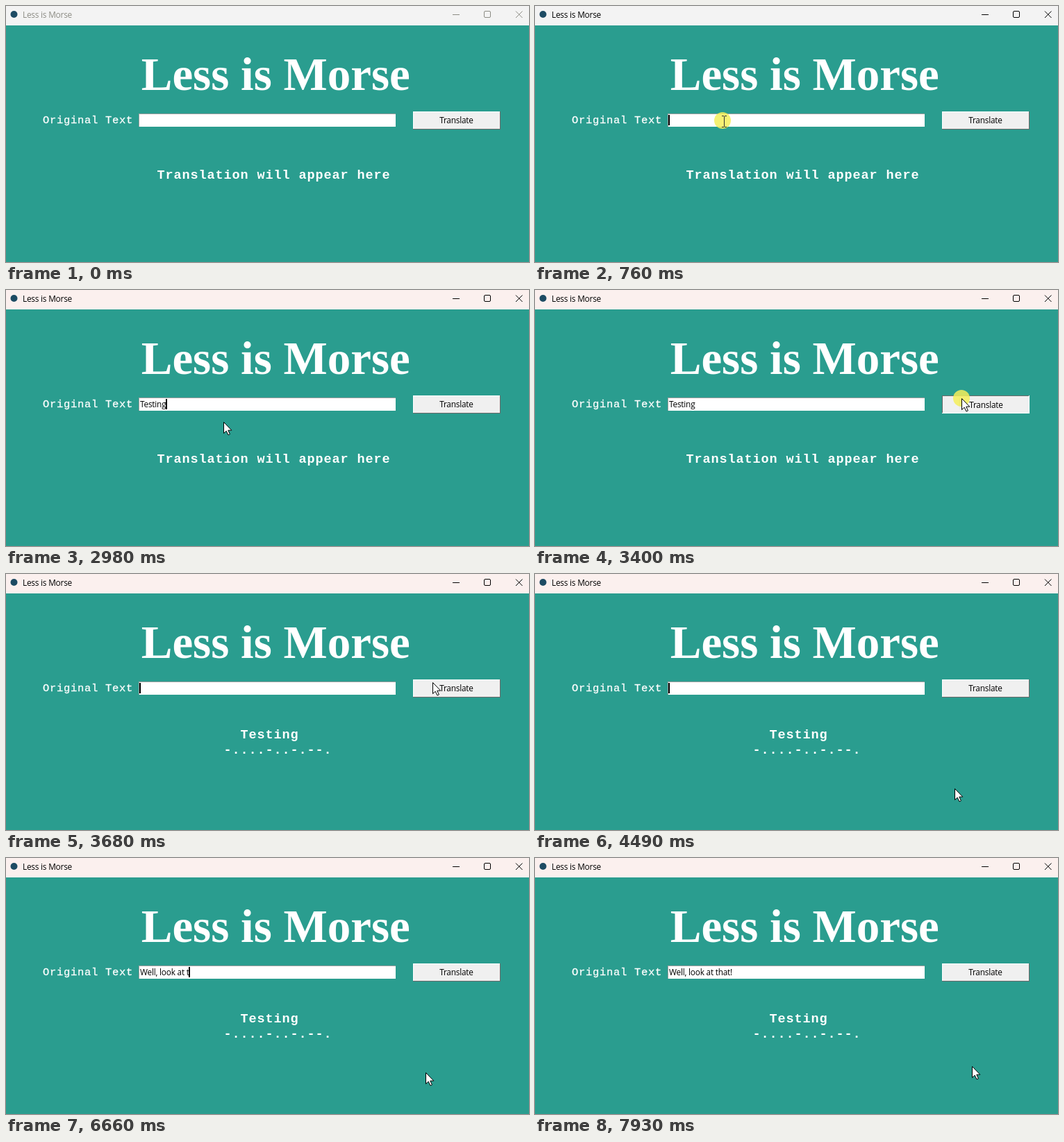
These frames come from a looping animation (753x369 px, 8 s). An HTML page:

```html
<!DOCTYPE html>
<html lang="en">
<head>
<meta charset="utf-8">
<title>Less is Morse</title>
<style>
  html, body { margin: 0; width: 100%; height: 100%; overflow: hidden; background: #2a9d8f; }
  svg { display: block; width: 753px; height: 369px; }
  text { white-space: pre; }
  .ui { font: 11.8px "Open Sans", "Noto Sans", sans-serif; letter-spacing: -.2px; }
  .mono { font: 15.5px "Liberation Mono", monospace; letter-spacing: .7px; fill: #fff; stroke: #fff; stroke-width: .3px; }
  .bold { font-size: 18.5px; font-weight: bold; letter-spacing: .9px; stroke: none; }
  .head { font: bold 67px "Liberation Serif", serif; fill: #fff; }
  .crisp { shape-rendering: crispEdges; }
  #bar { animation: tint 8s linear infinite; }
  @keyframes tint {
    0%, 10.4% { fill: #f3f3f3; }
    12.9%, 100% { fill: #fbf0ee; }
  }
</style>
</head>
<body>
<svg viewBox="0 0 753 369">
  <rect width="753" height="369" fill="#2a9d8f"/>
  <rect id="bar" class="crisp" width="753" height="28" fill="#f3f3f3"/>
  <circle cx="11.5" cy="12" r="5" fill="#1d4b63"/>
  <g id="chrome">
    <text class="ui" x="24" y="17">Less is Morse</text>
    <g fill="none" stroke="currentColor">
      <path d="M643 12.5h10M734 7.5l9.5 9.5m0-9.5l-9.5 9.5"/>
      <rect x="688.5" y="7.5" width="9" height="9" rx="1.5"/>
    </g>
  </g>

  <text class="head" x="194.7" y="121">Less is Morse</text>
  <text class="mono" x="53" y="169">Original Text</text>

  <rect class="crisp" x="191" y="155" width="370" height="19" fill="#fff"/>
  <path class="crisp" d="M191.5 174V155.5H561" fill="none" stroke="#a0a0a0"/>
  <text id="typed" class="ui" x="193" y="169"></text>
  <rect id="caret" class="crisp" y="157" width="2" height="15"/>

  <g class="crisp">
    <rect x="586" y="152" width="126" height="26" fill="#f0f0f0"/>
    <path id="lit" d="M586.5 177V152.5H711" fill="none"/>
    <path id="dark" d="M586 177.5H711.5V152" fill="none"/>
  </g>
  <text id="label" class="ui" x="648.5" y="169" text-anchor="middle">Translate</text>

  <text id="hint" class="mono bold" x="217.5" y="248.5">Translation will appear here</text>
  <g id="result" class="mono bold">
    <text x="337.5" y="236.5">Testing</text>
    <text x="313.5" y="258.5">-....-..-.--.</text>
  </g>

  <circle id="halo" r="12" fill="#f4ee5a" opacity=".85"/>
  <g id="pointer">
    <path id="arrow" d="M.5.5V16.6L4.2 13.2 7 19 9.4 17.9 6.8 12.2H11.8Z" fill="#fff" stroke="#000"/>
    <path id="beam" class="crisp" d="M-3-6.5H0M1-6.5H4M.5-6V9M-3 9.5H0M1 9.5H4" fill="none" stroke="#333"/>
  </g>
</svg>
<script>
const LOOP = 8000, FOCUS = 620, PRESS = 3400, RELEASE = 3540;
const KEY = 130, BLINK = 927, LIT = 610, FIRST = 750;

const $ = id => document.getElementById(id);
const show = (id, on) => $(id).setAttribute("visibility", on ? "visible" : "hidden");
const within = (t, a, b) => t >= a && t < b;

// each glide is a quadratic curve through a, bending towards b, ending at c
const glides = [
  { start: 70, end: 580, a: [547, 278], b: [400, 58], c: [272, 165] },
  { start: 2980, end: 3370, a: [313, 190], b: [601, 273], c: [614, 156] },
  { start: 3750, end: 4160, a: [614, 156], b: [596, 234], c: [604, 309] },
  { start: 7700, end: 7930, a: [604, 309], b: [616, 304], c: [629, 300] }
];

function place(t) {
  const g = glides.filter(g => g.start <= t).pop();
  if (!g || within(t, 830, 2980)) return null;
  const u = Math.min(1, (t - g.start) / (g.end - g.start));
  const k = u * u * (3 - 2 * u);
  return g.a.map((a, i) => Math.round(
    a * (1 - k) ** 2 + 2 * g.b[i] * k * (1 - k) + g.c[i] * k * k));
}

function typed(t) {
  const [text, start] = t < RELEASE ? ["Testing", 1430] : ["Well, look at that!", 4820];
  return text.slice(0, Math.max(0, Math.floor((t - start) / KEY) + 1));
}

function draw(t) {
  const ink = t < FOCUS ? "#8c8c84" : "#000";
  $("chrome").setAttribute("fill", ink);
  $("chrome").setAttribute("color", ink);

  const text = typed(t);
  $("typed").textContent = text;
  const width = text ? $("typed").getComputedTextLength() : 0;
  $("caret").setAttribute("x", Math.ceil(192 + width));
  show("caret", t >= FIRST && (t - FIRST) % BLINK < LIT);

  const down = within(t, PRESS, RELEASE);
  $("lit").setAttribute("stroke", down ? "#696969" : "#fff");
  $("dark").setAttribute("stroke", down ? "#fff" : "#696969");
  $("label").setAttribute("transform", down ? "translate(1 1)" : "");
  show("hint", t < RELEASE);
  show("result", t >= RELEASE);

  const spot = place(t);
  const entry = within(t, FOCUS, 830);
  show("halo", entry || within(t, PRESS, 3620));
  $("halo").setAttribute("transform", entry ? "translate(270 165)" : "translate(614 156)");
  const beam = spot && within(spot[0], 191, 561) && within(spot[1], 155, 174);
  show("arrow", spot && !beam);
  show("beam", beam);
  if (spot) $("pointer").setAttribute("transform", `translate(${spot})`);
}

function tick() {
  draw(performance.now() % LOOP);
  requestAnimationFrame(tick);
}
tick();
</script>
</body>
</html>
```
